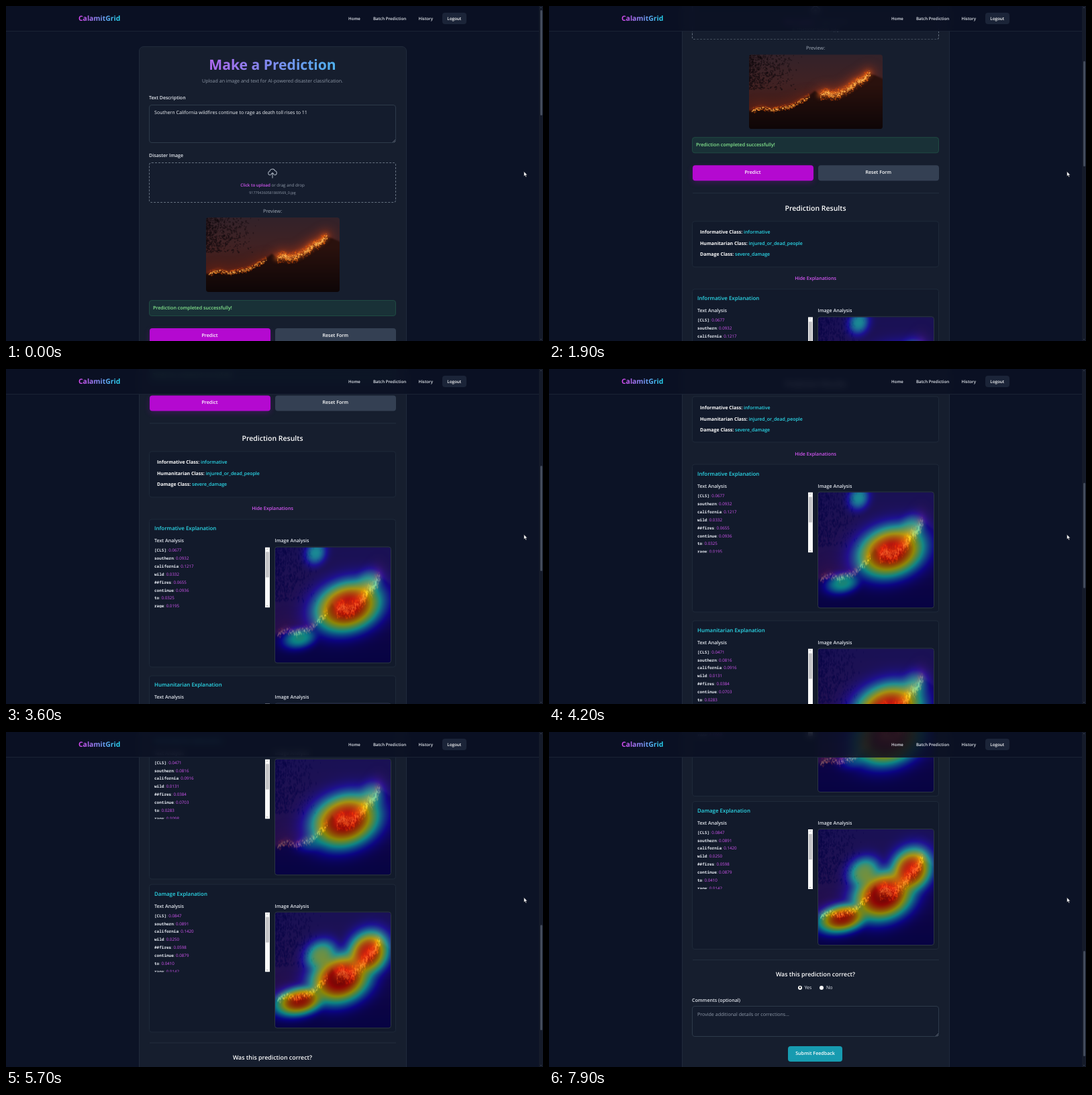
Animation of 800 by 499 pixels, one loop 8 s. Source, as an HTML page with a canvas:

```html
<!DOCTYPE html>
<html lang="en">
<head>
<meta charset="utf-8">
<title>CalamitGrid</title>
<style>
@property --s { syntax: "<number>"; inherits: true; initial-value: 0; }
@keyframes scroll {
  0% { --s: 0; animation-timing-function: steps(9); }
  11.25% { --s: 140.5; animation-timing-function: steps(20); }
  36.25% { --s: 345; animation-timing-function: steps(13); }
  52.5% { --s: 522.5; animation-timing-function: steps(8); }
  62.5% { --s: 720.5; animation-timing-function: steps(13); }
  78.75% { --s: 1051; }
  96.25% { --s: 1051; animation-timing-function: steps(2); }
  98.75%, 100% { --s: 1022; }
}
* { box-sizing: border-box; }
html, body { margin: 0; width: 100%; height: 100%; overflow: hidden; background: #0c1326; }
body {
  position: relative; color: #e5e9f0;
  font: 400 7.1px/20px "Open Sans", "Noto Sans", sans-serif;
  text-rendering: geometricPrecision;
  animation: scroll 8s linear infinite;
}
#page { position: absolute; left: 0; top: 0; width: 794px; height: 1550px; transform: translateY(calc(var(--s) * -1px)); }
.t, .box { position: absolute; left: calc(var(--x) * 1px); top: calc(var(--y) * 1px); }
.t { margin-top: -10px; height: 20px; white-space: pre; }
.c { left: 197px; width: 400px; text-align: center; }
.b { font-weight: 600; }
.box { width: calc(var(--w) * 1px); height: calc(var(--h) * 1px); border-radius: 4px; }
.mid { text-align: center; line-height: 22.5px; font-weight: 600; color: #fff; }
.card { background: #161e2e; border: 1px solid #202a3b; border-radius: 7px; }
.field { background: #141c2d; border: 1px solid #2d3a4a; }
.panel { background: #121a2b; border: 1px solid #1e2939; }
.drop { background: #151d2e; border: 1px dashed #64707f; }
.hr { background: #232e3e; border-radius: 0; }
.cyan { color: #2cdaea; }
.pink { color: #d456f4; }
.grey { color: #8f99a8; }
.grad { color: transparent; background: linear-gradient(90deg, #d946ef, #22d3ee); -webkit-background-clip: text; background-clip: text; }
canvas, svg { position: absolute; }
.list { overflow: hidden; border-radius: 0; }
.list .t { font-size: 6.2px; }
code { font: 700 6px/20px "Noto Sans Mono", "DejaVu Sans Mono", monospace; color: #e8ecf4; }
.bar { position: absolute; right: 0; top: 0; width: 7px; height: 100%; background: #fafafa; }
.bar i { position: absolute; left: 1.2px; top: 7px; width: 4.6px; height: 38px; background: #c3c3c6; }
.bar::before, .bar::after { content: ""; position: absolute; left: 2px; border: 1.5px solid transparent; }
.bar::before { top: 1px; border-bottom-color: #777; }
.bar::after { bottom: 1px; border-top-color: #555; }
.radio { width: 6px; height: 6px; border-radius: 50%; background: #fff; }
.on::after { content: ""; position: absolute; left: 1.7px; top: 1.7px; width: 2.6px; height: 2.6px; border-radius: 50%; background: #222; }
header { position: absolute; left: 0; top: 0; width: 794px; height: 38px; background: rgba(11, 17, 36, .86); border-bottom: 1px solid #1a2335; backdrop-filter: blur(5px); }
#rail { position: absolute; right: 0; top: 0; width: 6px; height: 100%; background: #151b2a; }
#rail i { position: absolute; left: 1.5px; top: 6px; width: 3px; height: 157px; border-radius: 1.5px; background: #444c5c; transform: translateY(calc(var(--s) * .313px)); }
#rail::before, #rail::after { content: ""; position: absolute; left: 1.5px; border: 1.5px solid transparent; }
#rail::before { top: 1px; border-bottom-color: #596273; }
#rail::after { bottom: 1px; border-top-color: #596273; }
</style>
</head>
<body>
<div id="page">
  <div class="box card" style="--x:198;--y:59.5;--w:399;--h:1467.5"></div>
  <div class="t b grad" style="--x:213.5;--y:88;width:367px;height:32px;margin-top:-16px;line-height:32px;text-align:center;font-size:21.1px;font-weight:700">Make a Prediction</div>
  <div class="t c grey" style="--y:111.5">Upload an image and text for AI-powered disaster classification.</div>

  <div class="t b" style="--x:213;--y:137.5;font-size:7px">Text Description</div>
  <div class="box field" style="--x:213;--y:146.5;--w:368;--h:57.5"></div>
  <div class="t" style="--x:221;--y:158.5;color:#f2f5f9">Southern California wildfires continue to rage as death toll rises to 11</div>
  <svg style="left:576px;top:199px" width="4" height="4" stroke="#8a93a0" stroke-width=".6"><path d="M0 4 4 0M2 4 4 2"/></svg>

  <div class="t b" style="--x:213;--y:223">Disaster Image</div>
  <div class="box drop" style="--x:213;--y:232.5;--w:367.5;--h:60"></div>
  <svg style="left:389.5px;top:241.5px" width="14" height="15" fill="none" stroke="#a2abb8" stroke-width="1.1" stroke-linecap="round" stroke-linejoin="round">
    <path d="M4 9.8H3.3a2.8 2.8 0 0 1-.5-5.5 4.2 4.2 0 0 1 8-.8 3.2 3.2 0 0 1-.3 6.3H10M7 14V6.6M4.7 8.8 7 6.5l2.3 2.3"/>
  </svg>
  <div class="t c grey" style="--y:267;font-size:6.25px"><span class="b pink">Click to upload</span> or drag and drop</div>
  <div class="t c grey" style="--y:277.5;font-size:5.35px">917794360581869569_0.jpg</div>
  <div class="t c" style="--y:305.5;font-size:7.3px;color:#a5aebb">Preview:</div>
  <canvas id="photo" width="398" height="222" style="left:297.5px;top:315px;width:199px;height:111px;border-radius:4px"></canvas>

  <div class="box" style="--x:213;--y:438;--w:368;--h:23.5;background:#193137;border:1px solid #1f4a42"></div>
  <div class="t b" style="--x:219;--y:450;color:#86e98f">Prediction completed successfully!</div>
  <div class="box mid" style="--x:213.5;--y:480;--w:180;--h:22.5;background:#b409d0;box-shadow:0 3px 8px rgba(180,10,210,.22)">Predict</div>
  <div class="box mid" style="--x:401;--y:480;--w:179.5;--h:22.5;background:#344053">Reset Form</div>

  <div class="box hr" style="--x:213.5;--y:520.5;--w:367;--h:1"></div>
  <div class="t c b" style="--y:545;font-size:10.5px;color:#fff">Prediction Results</div>
  <div class="box panel" style="--x:213;--y:562.5;--w:368;--h:69"></div>
  <div id="classes"></div>
  <div class="t c b pink" style="--y:648.5">Hide Explanations</div>
  <div id="sections"></div>

  <div class="box hr" style="--x:213.5;--y:1360.5;--w:367;--h:1"></div>
  <div class="t c b" style="--y:1383;font-size:8.85px;color:#fff">Was this prediction correct?</div>
  <div class="box radio on" style="--x:371;--y:1399.5"></div>
  <div class="t" style="--x:380.5;--y:1402.5">Yes</div>
  <div class="box radio" style="--x:402.5;--y:1399.5"></div>
  <div class="t" style="--x:413;--y:1402.5">No</div>
  <div class="t b" style="--x:213;--y:1421.5">Comments (optional)</div>
  <div class="box field" style="--x:213;--y:1430;--w:368;--h:46"></div>
  <div class="t grey" style="--x:221;--y:1442.5">Provide additional details or corrections...</div>
  <svg style="left:576px;top:1471px" width="4" height="4" stroke="#8a93a0" stroke-width=".6"><path d="M0 4 4 0M2 4 4 2"/></svg>
  <div class="box mid" style="--x:356;--y:1490;--w:81;--h:22.5;background:#179bb0">Submit Feedback</div>
</div>

<header>
  <div class="t grad" style="--x:108;--y:19;font-size:10.4px;font-weight:700">CalamitGrid</div>
  <div class="t b" style="--x:510;--y:19;font-size:6.2px">Home</div>
  <div class="t b" style="--x:547;--y:19;font-size:6.2px">Batch Prediction</div>
  <div class="t b" style="--x:614.5;--y:19;font-size:6.2px">History</div>
  <div class="box mid" style="--x:649.5;--y:10;--w:36.5;--h:17;line-height:17px;font-size:6.25px;background:#1b2438">Logout</div>
</header>
<div id="rail"><i></i></div>
<svg style="left:771px;top:246px" width="7" height="10"><path d="M.6.6V7.6L2.2 6.2 3.3 8.8 4.5 8.3 3.4 5.8H5.6Z" fill="#fff" stroke="#10131c" stroke-width=".5"/></svg>

<script>
const $ = id => document.getElementById(id);

$('classes').innerHTML = [
  ['Informative', 'informative', 580.5],
  ['Humanitarian', 'injured_or_dead_people', 597.5],
  ['Damage', 'severe_damage', 614]
].map(([name, value, y]) =>
  `<div class="t b" style="--x:225;--y:${y};font-size:7px;color:#fff"><b>${name} Class:</b> <span class="cyan">${value}</span></div>`
).join('');

// Heat spots: x, y, x radius, y radius, strength
const sections = [
  { name: 'Informative', top: 664, odds: [677, 932, 1217, 332, 655, 936, 325, 195],
    spots: [[108, 88, 50, 38, .91], [60, 8, 16, 18, .36], [36, 135, 26, 16, .4], [138, 54, 22, 22, .38]] },
  { name: 'Humanitarian', top: 896.5, odds: [471, 816, 916, 131, 384, 703, 283, 98],
    spots: [[104, 91, 51, 40, .91], [142, 56, 22, 24, .36], [55, 122, 24, 16, .25]] },
  { name: 'Damage', top: 1124.5, odds: [847, 891, 1420, 250, 598, 879, 410, 142],
    spots: [[97, 98, 45, 37, .94], [138, 60, 31, 33, .87], [36, 132, 37, 21, .85], [68, 64, 25, 24, .52]] }
];
const tokens = ['[CLS]', 'southern', 'california', 'wild', '##fires', 'continue', 'to', 'rage'];

function sectionHtml({ name, top, odds }) {
  const rows = tokens.map((word, i) =>
    `<div class="t" style="--x:0;--y:${5 + i * 11.85}"><code>${word}</code><span class="grey">: </span><span class="pink">${(odds[i] / 1e4).toFixed(4)}</span></div>`
  ).join('');
  return `<div class="box panel" style="--x:213;--y:${top};--w:368;--h:221"></div>
    <div class="t b cyan" style="--x:221;--y:${top + 15};font-size:7.93px">${name} Explanation</div>
    <div class="t b" style="--x:221;--y:${top + 33}">Text Analysis</div>
    <div class="t b" style="--x:400.5;--y:${top + 33}">Image Analysis</div>
    <div class="box list" style="--x:221;--y:${top + 42.3};--w:172;--h:89.7">${rows}<div class="bar"><i></i></div></div>
    <canvas class="heat" width="172" height="172" style="left:401px;top:${top + 42}px;border-radius:3px;outline:.5px solid #2b3444"></canvas>`;
}

let seed = 7;
const rnd = () => (seed = seed * 16807 % 2147483647) / 2147483647;

// Burning ridges at dusk, drawn in a 199 x 111 space
function drawPhoto(canvas) {
  const g = canvas.getContext('2d');
  g.scale(2, 2);
  const sky = g.createLinearGradient(0, 0, 0, 80);
  sky.addColorStop(0, '#33222a');
  sky.addColorStop(.5, '#402224');
  sky.addColorStop(1, '#451c17');
  g.fillStyle = sky;
  g.fillRect(0, 0, 199, 111);

  const left = [[4, 83], [18, 78], [32, 82], [48, 79], [62, 76], [75, 69], [88, 62]];
  const right = [[106, 60], [115, 56], [123, 60], [134, 57], [148, 50], [158, 41], [168, 37], [178, 28]];
  const trace = pts => pts.forEach(p => g.lineTo(...p));
  const stroke = (pts, color, width, blur) => {
    g.filter = `blur(${blur}px)`;
    g.strokeStyle = color;
    g.lineWidth = width;
    g.lineCap = g.lineJoin = 'round';
    g.beginPath();
    trace(pts);
    g.stroke();
    g.filter = 'none';
  };

  stroke(left, 'rgba(130,40,20,.45)', 14, 14);
  stroke(right, 'rgba(170,58,25,.6)', 20, 14);

  const ground = g.createLinearGradient(0, 45, 0, 111);
  ground.addColorStop(0, '#2a110d');
  ground.addColorStop(1, '#0e0607');
  g.fillStyle = ground;
  g.filter = 'blur(2px)';
  g.beginPath();
  g.moveTo(-9, 120);
  g.lineTo(-9, 85);
  trace(left);
  g.lineTo(98, 54);
  trace(right);
  g.lineTo(188, 31);
  g.lineTo(208, 40);
  g.lineTo(208, 120);
  g.fill();
  g.filter = 'none';

  stroke(left, 'rgba(170,62,18,.8)', 3, 4);
  stroke(right, 'rgba(214,90,24,.85)', 8, 7);

  // Soft specks around the ridge, hottest at its centre
  const flames = (pts, count, spread) => {
    for (let n = 0; n < count; n++) {
      const k = rnd() * (pts.length - 1), i = k | 0, f = k - i;
      const [ax, ay] = pts[i], [bx, by] = pts[i + 1];
      const off = rnd() + rnd() - 1, far = Math.abs(off);
      g.fillStyle = `hsla(${36 - far * 22},95%,${66 - far * 26}%,${.8 - far * .6})`;
      g.beginPath();
      g.ellipse(ax + (bx - ax) * f + rnd() * 3, ay + (by - ay) * f + 1 + off * spread, .4 + rnd() * .8, .4 + rnd(), rnd() * 3, 0, 7);
      g.fill();
    }
  };
  flames(left, 190, 5);
  flames(right, 420, 10);

  g.fillStyle = 'rgba(18,10,13,.5)';
  for (let n = 0; n < 520; n++) {
    const x = rnd() * rnd() * 80, y = rnd() * 52;
    g.beginPath();
    g.ellipse(x, y, .5 + rnd() * 1.6, .4 + rnd(), rnd() * 3, 0, 7);
    g.fill();
  }
}

const clamp = v => Math.max(0, Math.min(1, v));
const jet = h => [3, 2, 1].map(k => clamp(1.5 - Math.abs(4 * h - k)) * 255);

function drawHeat(canvas, spots) {
  const g = canvas.getContext('2d'), size = 172;
  g.drawImage($('photo'), 0, 0, size, size);
  const img = g.getImageData(0, 0, size, size), d = img.data;
  for (let y = 0; y < size; y++) for (let x = 0; x < size; x++) {
    let sum = 0;
    for (const [cx, cy, rx, ry, amp] of spots) {
      const dx = x - cx, dy = y - cy + .15 * dx;
      sum += (amp * Math.exp(-(Math.hypot(dx / rx, dy / ry) ** 2.6))) ** 3;
    }
    const color = jet(Math.cbrt(sum)), at = (y * size + x) * 4;
    for (let c = 0; c < 3; c++) d[at + c] = d[at + c] * .5 + color[c] * .5;
  }
  g.putImageData(img, 0, 0);
}

$('sections').innerHTML = sections.map(sectionHtml).join('');
drawPhoto($('photo'));
document.querySelectorAll('.heat').forEach((c, i) => drawHeat(c, sections[i].spots));
</script>
</body>
</html>
```
